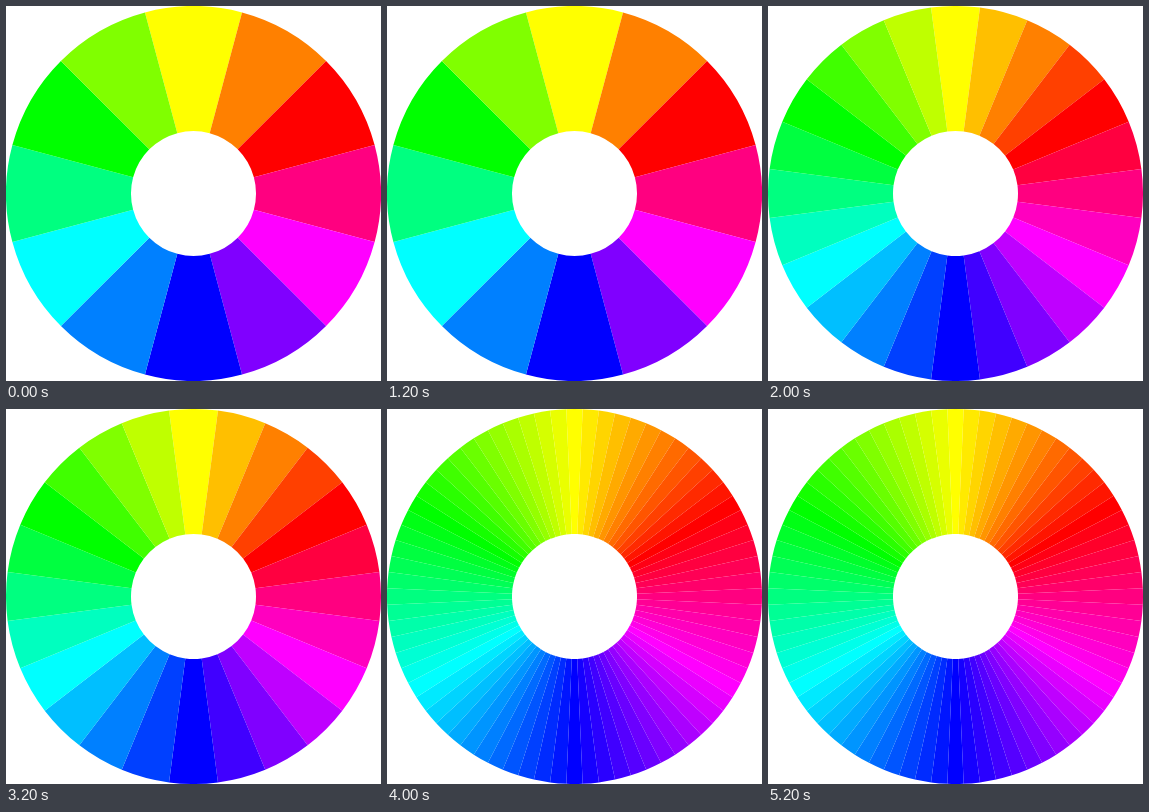
These frames come from a looping animation (375x375 px, 6000 ms). An HTML page with a canvas:

```html
<!DOCTYPE html>
<html lang="en">
<head>
<meta charset="utf-8">
<title>Colour wheel</title>
<style>
  html, body { margin: 0; height: 100%; overflow: hidden; background: #fff; }
  canvas { display: block; }
</style>
</head>
<body>
<canvas id="wheel" width="375" height="375"></canvas>
<script>
const ctx = document.getElementById('wheel').getContext('2d');
const CENTER = 187.5, OUTER = 187.5, INNER = 62.5;
const STEP_MS = 2000;
const SEGMENT_COUNTS = [12, 24, 72];

// Yellow sits at the top; the hue falls as the wheel turns clockwise.
function drawWheel(count) {
  ctx.fillStyle = '#fff';
  ctx.fillRect(0, 0, 375, 375);
  const width = 2 * Math.PI / count;
  for (let i = 0; i < count; i++) {
    const start = -Math.PI / 2 + (i - 0.5) * width;
    ctx.fillStyle = `hsl(${(420 - i * 360 / count) % 360}, 100%, 50%)`;
    ctx.beginPath();
    ctx.arc(CENTER, CENTER, OUTER, start, start + width);
    ctx.arc(CENTER, CENTER, INNER, start + width, start, true);
    ctx.fill();
  }
}

function frame() {
  const step = Math.floor(performance.now() / STEP_MS) % SEGMENT_COUNTS.length;
  drawWheel(SEGMENT_COUNTS[step]);
  requestAnimationFrame(frame);
}
frame();
</script>
</body>
</html>
```
